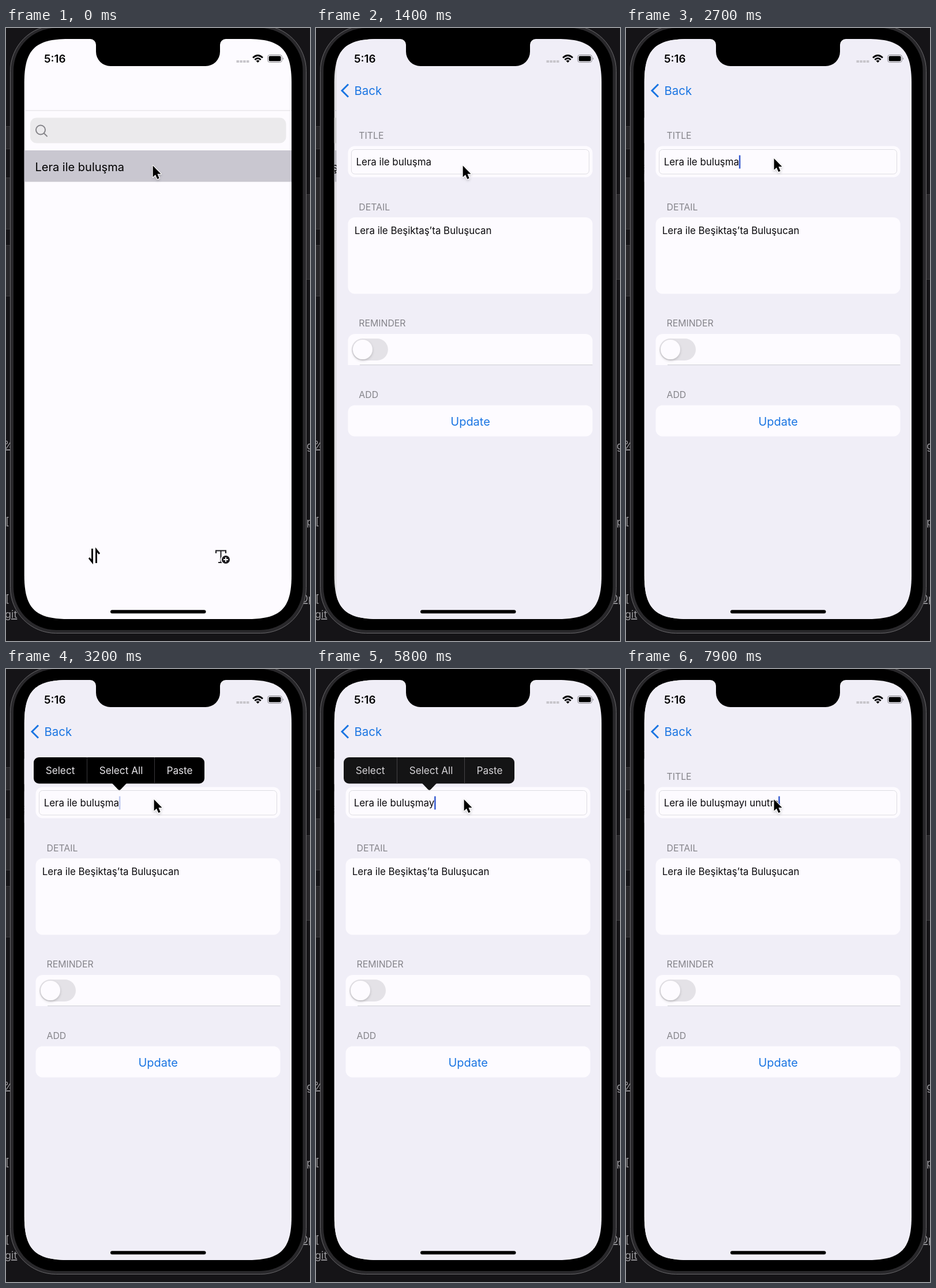
Recreate the animation shown at these times as an HTML page. Size 527x1062 px, loop 8000 ms.

```html
<!DOCTYPE html>
<html lang="en">
<head>
<meta charset="utf-8">
<title>Reminder editing</title>
<style>
  html, body { margin: 0; width: 100%; height: 100%; overflow: hidden; background: #151417; }
  svg { display: block; width: 100%; height: 100%; }
  text { font-family: Inter, sans-serif; white-space: pre; }
  .code { font: 18px "Noto Sans Mono", monospace; fill: #9b9a9e; }
  .underlined { text-decoration: underline; text-underline-offset: 4px; }
  .header { font-size: 15.8px; fill: #85848a; }
  .field { font-size: 16.9px; fill: #0b0a0d; }
  .body { font-size: 20px; }
  .blue { fill: #1a75e2; }
  .menu { font-size: 17.2px; fill: #e8e6ea; text-anchor: middle; }
  .card { fill: #fdfbff; }
  .line { fill: none; stroke: #000; }
</style>
</head>
<body>
<svg viewBox="0 0 527 1062" preserveAspectRatio="none">
  <defs>
    <clipPath id="screen">
      <path d="M31.700 95C31.700 37.500 50.500 19 108 19H419C476.500 19 495 37.500 495 95
               V948C495 1005.500 476.500 1024 419 1024H108C50.500 1024 31.700 1005.500 31.700 948Z"/>
    </clipPath>
    <filter id="soft" x="-50%" y="-50%" width="200%" height="200%">
      <feDropShadow dx="0" dy="2" stdDeviation="2" flood-opacity=".2"/>
    </filter>
  </defs>

  <!-- Editor window behind the phone -->
  <rect width="527" height="1062" fill="#151417"/>
  <g fill="#29282b" stroke="#3b3a3d">
    <rect x="-5" y="170.500" width="20" height="39"/>
    <rect x="-5" y="259.500" width="20" height="89"/>
    <rect x="-5" y="376.500" width="20" height="88"/>
    <rect x="510" y="288.500" width="20" height="147"/>
  </g>
  <g class="code">
    <text class="underlined" x="-4" y="729">%</text>
    <text x="-1" y="861">[</text>
    <text x="-1" y="995">[</text>
    <text class="underlined" x="-2" y="1022">git</text>
    <text class="underlined" x="521" y="730">g</text>
    <text class="underlined" x="521" y="862">p</text>
    <text class="underlined" x="510" y="995">Op</text>
  </g>

  <!-- Phone body -->
  <rect x="7.500" y="-4.500" width="513" height="1053" rx="79" fill="#29282b" stroke="#69686b"/>
  <rect x="13" y="0" width="501.500" height="1043" rx="74"/>

  <g clip-path="url(#screen)">
    <g id="list">
      <rect x="31" y="19" width="465" height="1006" fill="#fdfbff"/>
      <rect x="31" y="142.500" width="465" height="1" fill="#dfdde2"/>
      <rect x="42" y="155.500" width="443.500" height="44" rx="11" fill="#ebeaec"/>
      <g class="line" style="stroke:#858489" stroke-width="2" stroke-linecap="round">
        <circle cx="60" cy="176.500" r="8"/>
        <path d="M66 182.500L71 187.500"/>
      </g>
      <rect id="row" x="31" y="212" width="465" height="54.500" fill="#c9c7d0"/>
      <text class="body" x="50.500" y="247.500">Lera ile buluşma</text>
      <path class="line" stroke-width="2.900" d="M149.500 902V925L144 918M156.500 927V904L162 911"/>
      <path class="line" style="stroke:#1d1c20" stroke-width="2" d="M364 910V905.500H381V910M372.500 905.500V926M368 926H377"/>
      <circle cx="381" cy="921" r="8" fill="#1d1c20" stroke="#fdfbff" stroke-width="2"/>
      <path d="M377 921H385M381 917V925" stroke="#fff" stroke-width="1.800"/>
      <rect id="dim" x="31" y="19" width="465" height="1006"/>
    </g>

    <g id="form">
      <rect x="31.700" y="19" width="464" height="1006" fill="#f0eef7"/>
      <text class="header" x="70.500" y="191.500">TITLE</text>
      <rect class="card" x="51.500" y="204.500" width="424" height="54" rx="12"/>
      <rect x="57.500" y="210.500" width="412" height="42.500" rx="6" fill="none" stroke="#dddce1"/>
      <text class="field" id="title" x="65.700" y="238"></text>
      <rect id="caret" y="220.500" width="2.500" height="23" fill="#3459cf"/>

      <text class="header" x="70.500" y="315.700">DETAIL</text>
      <rect class="card" x="51.500" y="328" width="424" height="132.500" rx="12"/>
      <text class="field" x="62.800" y="357">Lera ile Beşiktaş’ta Buluşucan</text>

      <text class="header" x="70.500" y="517.300">REMINDER</text>
      <path class="card" d="M51.500 584V542a12 12 0 0 1 12-12H463.500a12 12 0 0 1 12 12V584Z"/>
      <rect x="72" y="583" width="403.500" height="1.200" fill="#d3d2d8"/>
      <rect x="58" y="538" width="63" height="38" rx="19" fill="#e4e2e7"/>
      <circle cx="77" cy="557" r="17" fill="#fdfbff" filter="url(#soft)"/>

      <text class="header" x="70.500" y="641.200">ADD</text>
      <rect class="card" x="51.500" y="653.500" width="424" height="54" rx="12"/>
      <text class="body blue" x="263.700" y="688.500" text-anchor="middle">Update</text>
    </g>

    <g id="back">
      <path d="M56 97.500L45 108.500L56 119.500" fill="none" stroke="#1a75e2" stroke-width="3"/>
      <text class="body blue" x="66.500" y="115.500" style="font-size:20.400px">Back</text>
    </g>

    <g id="menu">
      <path d="M184 198H209L199 208.500Q196.500 211 194 208.500Z"/>
      <rect x="48" y="153" width="296" height="45.500" rx="9"/>
      <g id="labels">
        <path d="M140.500 153V198.500M257.500 153V198.500" stroke="#39383b"/>
        <text class="menu" x="94" y="182">Select</text>
        <text class="menu" x="199.500" y="182">Select All</text>
        <text class="menu" x="301" y="182">Paste</text>
      </g>
    </g>

    <!-- Status bar -->
    <path d="M146 18V19A10 10 0 0 1 156 29V41A25 25 0 0 0 181 66H346A25 25 0 0 0 371 41V29A10 10 0 0 1 381 19V18Z"/>
    <text x="66" y="60" font-size="18.800" font-weight="600">5:16</text>
    <path d="M399.500 58H422" stroke="#c7c5cb" stroke-width="4" stroke-dasharray="4.500 1.300"/>
    <g class="line" stroke-width="2.700">
      <path d="M428 51.500Q436.500 43.500 445 51.500M431.300 55Q436.500 50 441.700 55"/>
      <path d="M436.500 60L433.500 57Q436.500 54.500 439.500 57Z" fill="#000" stroke="none"/>
    </g>
    <rect x="453.500" y="46.500" width="25" height="13" rx="4" fill="none" stroke="#8a898e"/>
    <rect x="455.500" y="48.500" width="21" height="9" rx="2"/>
    <path d="M480 51Q482.500 53 480 55Z" fill="#8a898e"/>
    <rect x="181" y="1008.300" width="165.500" height="6" rx="3"/>
  </g>

  <g id="pointer" filter="url(#soft)">
    <path transform="translate(.6 1) scale(.88)"
          d="M0 0V22.500L5 17.800L8.800 26.300L12.600 24.600L8.900 16.300H15.800Z"
          stroke="#fff" stroke-width="2.600" paint-order="stroke" stroke-linejoin="round"/>
  </g>
</svg>

<script>
const LOOP = 8000;
const PUSH_AT = 1050, FOCUS_AT = 2700, TYPING_AT = 5750;
const START_TEXT = "Lera ile buluşma";
const KEYS = [["y", 5750], ["ı", 5900], [" ", 6300], ["u", 6500], ["n", 6750],
              ["u", 7000], ["t", 7250], ["m", 7600]];
const POINTER = [[0, 254, 237.5], [1500, 254, 237.5], [1800, 252, 234.5],
                 [1950, 252, 234.5], [2200, 256, 225], [LOOP, 256, 225]];

const el = id => document.getElementById(id);
const [list, row, dim, form, back, menu, labels, title, caret, pointer] =
  ["list", "row", "dim", "form", "back", "menu", "labels", "title", "caret", "pointer"].map(el);

const clamp = v => Math.min(1, Math.max(0, v));
const ramp = (t, from, to) => clamp((t - from) / (to - from));
const smooth = s => s * s * (3 - 2 * s);
const shift = (node, x, y = 0) => node.setAttribute("transform", `translate(${x} ${y})`);
const fade = (node, alpha) => node.setAttribute("opacity", alpha);

// Critically damped spring from 0 to 1
function spring(ms) {
  const x = Math.max(0, ms) * 0.0195;
  return x > 12 ? 1 : 1 - (1 + x) * Math.exp(-x);
}

function pointerAt(t) {
  const i = POINTER.findIndex(p => p[0] > t);
  const [t0, x0, y0] = POINTER[i - 1], [t1, x1, y1] = POINTER[i];
  const s = smooth(ramp(t, t0, t1));
  return [x0 + (x1 - x0) * s, y0 + (y1 - y0) * s];
}

function caretAlpha(t) {
  if (t < FOCUS_AT) return 0;
  if (t >= TYPING_AT) return 1;
  const phase = (t - FOCUS_AT - 50 + 1000) % 1000;
  return 1 - ramp(phase, 350, 500) + ramp(phase, 700, 850);
}

function draw(t) {
  const push = spring(t - PUSH_AT);
  shift(list, -139 * push);
  fade(row, 1 - 0.2 * push);
  fade(dim, 0.12 * push);
  shift(form, 463.5 * (1 - push));
  fade(back, clamp(push * 1.25));

  const menuAlpha = smooth(ramp(t, 2950, 3150)) * (1 - smooth(ramp(t, TYPING_AT, 6035)));
  fade(menu, menuAlpha);
  fade(labels, menuAlpha);

  title.textContent = START_TEXT + KEYS.filter(k => t >= k[1]).map(k => k[0]).join("");
  caret.setAttribute("x", 65.5 + title.getComputedTextLength());
  fade(caret, caretAlpha(t));

  shift(pointer, ...pointerAt(t));
}

function tick() {
  draw(performance.now() % LOOP);
  requestAnimationFrame(tick);
}
tick();
</script>
</body>
</html>
```
